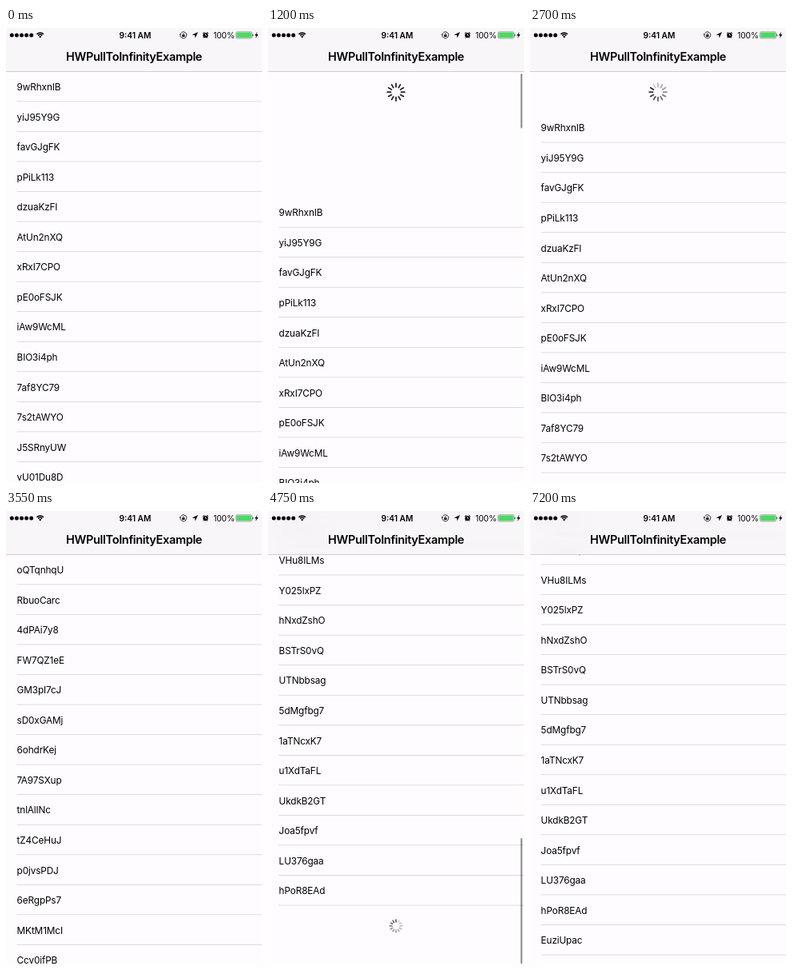
These frames come from a looping animation (320x569 px, 8.05 s). An HTML page with a canvas:

```html
<!DOCTYPE html>
<html lang="en">
<head>
<meta charset="utf-8">
<title>HWPullToInfinityExample</title>
<style>
html, body { margin: 0; width: 100%; height: 100%; overflow: hidden; background: #fefcff; }
canvas { display: block; }
</style>
</head>
<body>
<canvas id="stage" width="320" height="569"></canvas>
<script>
const ctx = document.getElementById('stage').getContext('2d');
const W = 320, H = 569, LOOP = 8050;
const POINT = 320 / 375;              // screen points to stage pixels
const TOP = 64 * POINT, ROW = 44 * POINT, LOADER = 60 * POINT;
const VIEW = H - TOP, FONT = 'Inter, sans-serif', PAPER = '#fefcff';

const PULL_START = 830, RELEASE = 1175, RELOAD = 3250, RELOAD_END = 3550;
const FLING_START = 4030, LOADED = 7200;
const PULL = 161.5, BOUNCE = 11.8;

let seed = 7;
const random = () => (seed = seed * 16807 % 2147483647) / 2147483647;
const LETTERS = 'ABCDEFGHIJKLMNOPQRSTUVWXYZabcdefghijklmnopqrstuvwxyz0123456789';
const randomName = () => Array.from({ length: 8 }, () => LETTERS[Math.floor(random() * 62)]).join('');

const firstRows = ('9wRhxnIB yiJ95Y9G favGJgFK pPiLk113 dzuaKzFI AtUn2nXQ xRxI7CPO ' +
  'pE0oFSJK iAw9WcML BIO3i4ph 7af8YC79 7s2tAWYO J5SRnyUW vU01Du8D').split(' ');
const freshRows = [
  ...('oQTqnhqU RbuoCarc 4dPAi7y8 FW7QZ1eE GM3pI7cJ sD0xGAMj 6ohdrKej ' +
    '7A97SXup tnlAlINc tZ4CeHuJ p0jvsPDJ 6eRgpPs7 MKtM1McI Ccv0ifPB').split(' '),
  ...Array.from({ length: 10 }, randomName),
  ...('W4nRb2pE VHu8ILMs Y025lxPZ hNxdZshO BSTrS0vQ UTNbbsag 5dMgfbg7 ' +
    '1aTNcxK7 u1XdTaFL UkdkB2GT Joa5fpvf LU376gaa hPoR8EAd').split(' ')
];
const moreRows = [...freshRows, 'EuziUpac'];

const FIRST_HEIGHT = 1161;
const FRESH_HEIGHT = freshRows.length * ROW + LOADER;
const BOTTOM = FRESH_HEIGHT - VIEW;

const clamp = x => Math.max(0, Math.min(1, x));
const ease = x => (1 - Math.cos(Math.PI * clamp(x))) / 2;

// Finger swipe, friction, then a damped bounce past the end
function fling(s) {
  const swipe = 0.15, glide = 0.48, tau = 0.4;
  const speed = BOTTOM / (swipe / 2 + tau * (1 - Math.exp(-glide / tau)));
  if (s < swipe) return speed * s * s / (2 * swipe);
  s -= swipe;
  if (s < glide) return speed * (swipe / 2 + tau * (1 - Math.exp(-s / tau)));
  s -= glide;
  return BOTTOM + speed * Math.exp(-glide / tau) * s * Math.exp(-BOUNCE * s);
}

function scrollAt(t) {
  if (t < PULL_START) return 0;
  if (t < RELEASE) return -PULL * ease((t - PULL_START) / (RELEASE - PULL_START));
  if (t < RELOAD) {
    const u = BOUNCE * (t - RELEASE) / 1000;
    return -LOADER - (PULL - LOADER) * (1 + u) * Math.exp(-u);
  }
  if (t < RELOAD_END) return -LOADER * (1 - ease((t - RELOAD) / (RELOAD_END - RELOAD)));
  return t < FLING_START ? 0 : fling((t - FLING_START) / 1000);
}

function text(str, x, y, size, weight = 400, spacing = 0, align = 'left') {
  ctx.font = `${weight} ${size}px ${FONT}`;
  ctx.letterSpacing = spacing + 'px';
  ctx.textAlign = align;
  ctx.fillStyle = '#000';
  ctx.fillText(str, x, y);
}

function box(x, y, w, h, r, color) {
  ctx.fillStyle = color;
  ctx.beginPath();
  ctx.roundRect(x, y, w, h, r);
  ctx.fill();
}

function path(d, color = '#000') {
  ctx.fillStyle = color;
  ctx.fill(new Path2D(d));
}

function arc(x, y, r, from = 0, to = 2 * Math.PI, width = 0.9) {
  ctx.lineWidth = width;
  ctx.strokeStyle = '#000';
  ctx.beginPath();
  ctx.arc(x, y, r, from, to);
  ctx.stroke();
}

function spinner(y, inner, outer, color, opacity) {
  ctx.save();
  ctx.translate(W / 2, y);
  for (let i = 0; i < 12; i++) {
    ctx.globalAlpha = opacity(i);
    box(-0.9, -outer, 1.8, outer - inner, 0.9, color);
    ctx.rotate(Math.PI / 6);
  }
  ctx.restore();
}

// Opacity falls off behind the leading blade
const spin = (t, phase) => {
  const lead = Math.floor(t * 12 / 1000 + phase);
  return i => 1 - 0.75 * (((lead - i) % 12 + 12) % 12) / 11;
};

function drawRefresh(t, pull) {
  if (pull < 1) return;
  ctx.save();
  ctx.beginPath();
  ctx.rect(0, TOP, W, pull);
  ctx.clip();
  const shown = clamp((pull - 25) / 100) * 12;
  const leave = clamp((t - RELOAD) / 250);
  const blades = t <= RELEASE + 45 ? i => clamp(shown - i) : spin(t - 1600, 9.2);
  const scale = 1 - 0.7 * leave;
  spinner(TOP + LOADER / 2, 5.6 * scale, 11.7 * scale, '#262628', i => blades(i) * (1 - leave));
  ctx.restore();
}

function drawRows(rows, scroll) {
  rows.forEach((name, i) => {
    const y = TOP + i * ROW - scroll;
    if (y < -ROW || y > H) return;
    text(name, 13.6, y + 23.5, 11.8, 400, -0.14);
    ctx.fillStyle = '#c8c7cc';
    ctx.fillRect(13.5, y + ROW - 0.6, W, 0.6);
  });
}

function drawScrollbar(t, scroll, height) {
  const fade = (from, to) => clamp((t - from) / 60) * (1 - clamp((t - to) / 250));
  const alpha = t < RELOAD ? fade(PULL_START, 1800) : fade(FLING_START, 5150);
  if (!alpha) return;
  const track = VIEW - 5, max = height - VIEW;
  const over = Math.max(0, -scroll, scroll - max);
  const length = track * VIEW / height - over;
  const y = TOP + 2.4 + (track - length) * clamp(scroll / max);
  box(315.7, y, 2.2, length, 1.1, `rgba(0,0,0,${0.42 * alpha})`);
}

function drawStatus() {
  for (let i = 0; i < 5; i++) {
    ctx.fillStyle = '#000';
    ctx.beginPath();
    ctx.arc(7.3 + i * 6.1, 8.9, 2.5, 0, 2 * Math.PI);
    ctx.fill();
  }
  const up = -Math.PI / 2;
  arc(42.7, 12, 6.1, up - 0.78, up + 0.78, 1.5);
  arc(42.7, 12, 3.7, up - 0.78, up + 0.78, 1.5);
  path('M42.7 12.6L41 10.7Q42.7 9.3 44.4 10.7Z');

  text('9:41 AM', 161.4, 12.6, 10.2, 600, 0, 'center');

  arc(221.8, 8.8, 4, -2.5, 3.2, 0.8);
  box(220.1, 8.4, 3.4, 2.5, 0.4, '#000');
  arc(221.8, 8.2, 1.1, Math.PI, 0, 0.7);
  path('M216.6 8.6H219.2L217.8 6.7Z');
  path('M240 5L236.6 12.6L236.1 9L232.6 8.5Z');

  ctx.fillStyle = '#000';
  ctx.beginPath();
  ctx.arc(249.4, 9.1, 3.2, 0, 2 * Math.PI);
  ctx.fill();
  arc(249.4, 9.1, 4.1, up - 1, up - 0.4, 0.9);
  arc(249.4, 9.1, 4.1, up + 0.4, up + 1, 0.9);
  path('M246.9 11.3L246.4 12.7L248 12.1ZM251.9 11.3L252.4 12.7L250.8 12.1Z');
  ctx.strokeStyle = '#fff';
  ctx.lineWidth = 0.7;
  ctx.stroke(new Path2D('M249.4 7V9.3H251'));

  text('100%', 259.2, 12.6, 10.2, 400, -0.1);
  ctx.strokeStyle = '#555';
  ctx.lineWidth = 0.5;
  ctx.beginPath();
  ctx.roundRect(287.5, 4.8, 20, 8.2, 1.6);
  ctx.stroke();
  box(288.3, 5.6, 18.4, 6.6, 0.9, '#4cd964');
  box(308.1, 7.6, 1.1, 2.6, 0.5, '#555');
  path('M314.2 4.8L310.9 9.4H312.9L312 13L315.4 8.1H313.3Z');
}

function drawHeader(rows, scroll) {
  ctx.save();
  ctx.beginPath();
  ctx.rect(0, 0, W, TOP);
  ctx.clip();
  ctx.fillStyle = '#f8f6f9';
  ctx.fillRect(0, 0, W, TOP);
  if (scroll > 0) {
    // Content shimmering through the translucent bar
    const first = Math.max(0, Math.floor((scroll - TOP) / ROW));
    ctx.filter = 'blur(11px)';
    ctx.globalAlpha = 0.1;
    drawRows(rows.slice(first, first + 4), scroll - first * ROW);
  }
  ctx.restore();
  ctx.fillStyle = '#c4c3c7';
  ctx.fillRect(0, 54, W, 0.8);
  drawStatus();
  text('HWPullToInfinityExample', 160.1, 41.2, 14.5, 600, -0.33, 'center');
}

function draw(t) {
  const scroll = scrollAt(t);
  const rows = t < RELOAD ? firstRows : t < LOADED ? freshRows : moreRows;
  ctx.fillStyle = PAPER;
  ctx.fillRect(0, 0, W, H);
  drawRefresh(t, -scroll);
  drawRows(rows, scroll);
  if (t > FLING_START && t < LOADED) {
    const y = TOP + FRESH_HEIGHT - LOADER / 2 - scroll;
    if (y < H + 10) spinner(y, 4.2, 8.6, '#6a6a6e', spin(t - 4750, 0.2));
  }
  drawScrollbar(t, scroll, t < RELOAD ? FIRST_HEIGHT : FRESH_HEIGHT);
  drawHeader(rows, scroll);
}

const start = performance.now();
function tick() {
  draw((performance.now() - start) % LOOP);
  requestAnimationFrame(tick);
}
tick();
</script>
</body>
</html>
```
